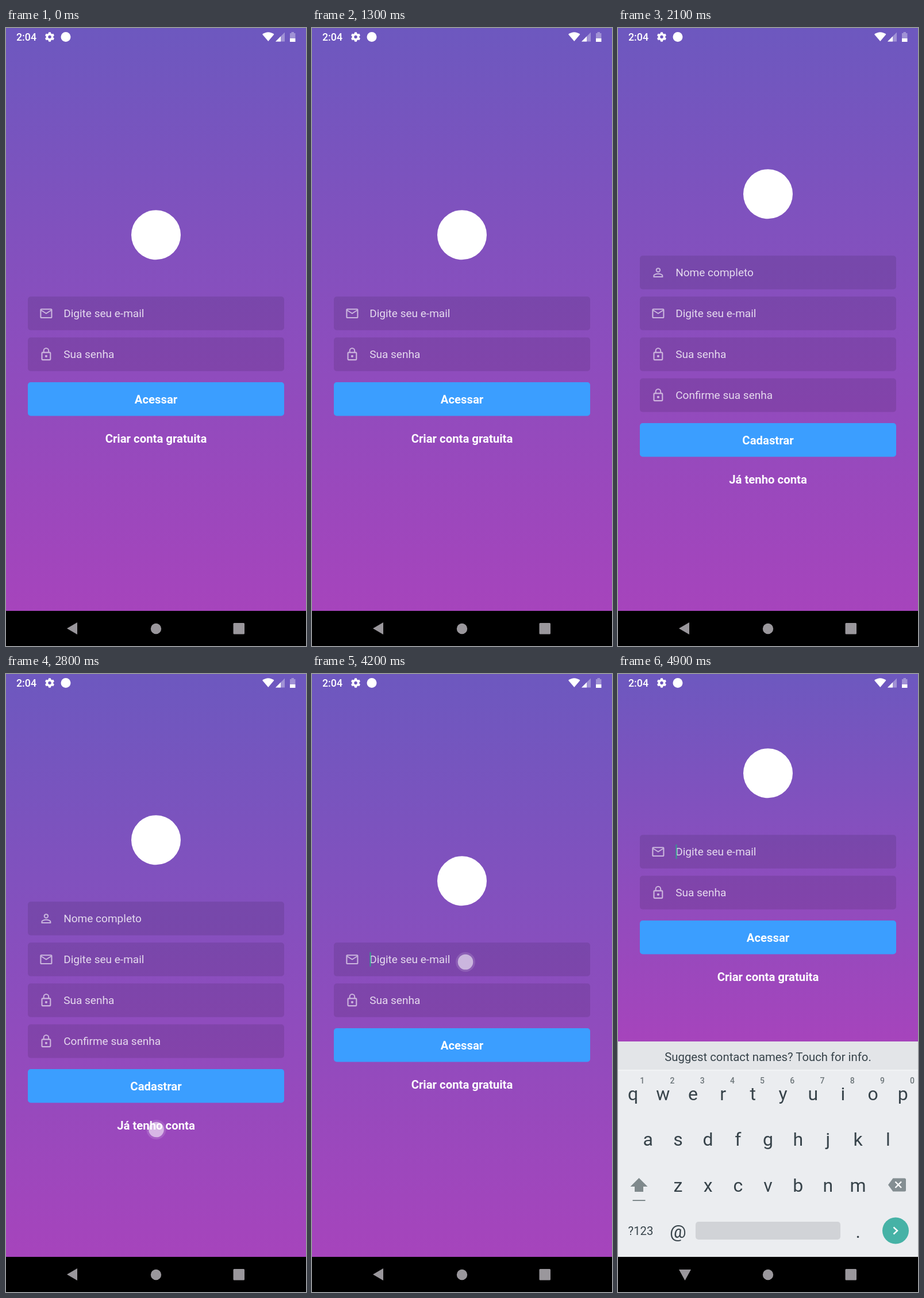
Animation, 522 px wide and 1073 px high, one loop 5 s. Source, as an HTML page:

```html
<!DOCTYPE html>
<html lang="pt-BR">
<head>
<meta charset="utf-8">
<title>Login</title>
<style>
  html, body { margin: 0; width: 100%; height: 100%; overflow: hidden; background: #000; }
  svg { display: block; width: 100vw; height: 100vh; }
  text { font-family: Roboto, sans-serif; fill: #fff; }
  .hint { font-size: 19.05px; fill-opacity: .8; }
  .bold { font-size: 20.32px; font-weight: 700; text-anchor: middle; }
  .icon { fill: #fff; fill-opacity: .6; }
  #keys text { fill: #37434a; text-anchor: middle; font-size: 32px; }
  #keys .digit { fill: #6c7579; font-size: 14px; font-weight: 500; }
  #keys .small { font-size: 20.32px; }
</style>
</head>
<body>
<svg id="stage" viewBox="0 0 522 1073" preserveAspectRatio="none"></svg>
<script>
const ICONS = {
  mail: 'M22 6c0-1.1-.9-2-2-2H4c-1.1 0-2 .9-2 2v12c0 1.1.9 2 2 2h16c1.1 0 2-.9 2-2V6zm-2 0l-8 5-8-5h16zm0 12H4V8l8 5 8-5v10z',
  lock: 'M12 17a2 2 0 1 0 0-4 2 2 0 0 0 0 4zm6-9h-1V6A5 5 0 0 0 7 6v2H6a2 2 0 0 0-2 2v10a2 2 0 0 0 2 2h12a2 2 0 0 0 2-2V10a2 2 0 0 0-2-2zM8.9 6a3.1 3.1 0 0 1 6.2 0v2H8.9V6zM18 20H6V10h12v10z',
  user: 'M12 5.9a2.1 2.1 0 1 1 0 4.2 2.1 2.1 0 0 1 0-4.2m0 9c3 0 6.1 1.5 6.1 2.1v1.1H5.9V17c0-.6 3.1-2.1 6.1-2.1M12 4a4 4 0 1 0 0 8 4 4 0 0 0 0-8zm0 9c-2.7 0-8 1.3-8 4v3h16v-3c0-2.7-5.3-4-8-4z'
};

const text = (x, y, cls, s) => `<text x="${x}" y="${y}" class="${cls}">${s}</text>`;
const box = (x, y, w, h, fill, r = 0) =>
  `<rect x="${x}" y="${y}" width="${w}" height="${h}" rx="${r}" fill="${fill}"/>`;
const path = (d, fill, extra = '') => `<path d="${d}" fill="${fill}" ${extra}/>`;
const circle = (x, y, r, fill, extra = '') =>
  `<circle cx="${x}" cy="${y}" r="${r}" fill="${fill}" ${extra}/>`;

const field = (y, icon, label) =>
  box(38, y, 446, 58.5, 'rgba(0,0,0,.1)', 5) +
  `<path class="icon" d="${ICONS[icon]}" transform="translate(57.2 ${y + 16.6}) scale(1.058)"/>` +
  text(100.2, y + 36, 'hint', label);

function form(top, fields, button, link) {
  const end = top + fields.length * 71;
  return circle(261, top - 107, 43, '#fff') +
    fields.map(([icon, label], i) => field(top + i * 71, icon, label)).join('') +
    box(38, end + 6.7, 446, 58.5, '#3b9eff', 5) +
    text(261, end + 44, 'bold', button) +
    text(261, end + 112, 'bold', link);
}

const row = (letters, x, y, cls = '') =>
  [...letters].map((c, i) => text(x + i * 52.2, y, cls, c)).join('');

function gear(x, y) {
  let s = `<g transform="translate(${x} ${y})"><circle r="4.6" fill="none" stroke="#fff" stroke-width="3.6"/>`;
  for (let a = 0; a < 360; a += 60)
    s += path('M-2.4-5L-1.8-8.2H1.8L2.4-5Z', '#fff', `transform="rotate(${a})"`);
  return s + '</g>';
}

const email = ['mail', 'Digite seu e-mail'], pass = ['lock', 'Sua senha'];

stage.innerHTML = `
<defs>
  <linearGradient id="sky" x1="0" y1="0" x2="0" y2="1">
    <stop stop-color="#6d58bf"/><stop offset="1" stop-color="#a644bc"/>
  </linearGradient>
</defs>
<rect id="back" width="522" height="1012" fill="url(#sky)"/>
<g id="login">${form(466.3, [email, pass], 'Acessar', 'Criar conta gratuita')}
  <rect id="caret" x="100.5" y="483" width="2" height="25" fill="#35998f"/>
</g>
<g id="signup">${form(395.3, [['user', 'Nome completo'], email, pass, ['lock', 'Confirme sua senha']],
  'Cadastrar', 'Já tenho conta')}</g>
<g id="status">
  <text x="18" y="22" font-size="17.8" font-weight="500">2:04</text>
  ${gear(76, 15.5)}
  ${circle(104, 15.5, 8.5, '#fff')}
  ${path('M446 11Q456.3 3.5 466.5 11L456.3 23Z', '#fff')}
  ${path('M469 23.5L485 7.5V23.5Z', '#fff', 'opacity=".35"')}
  ${path('M469 23.5L478 14.5V23.5Z', '#fff')}
  ${path('M494 9H496.5V7H501V9H503.5V18H494Z', '#fff', 'opacity=".35"')}
  ${path('M494 18H503.5V24H494Z', '#fff')}
</g>
<g id="keys">
  ${box(0, 638, 522, 374, '#ebedf0')}
  ${box(0, 638, 522, 50, '#e3e5e8')}
  ${box(0, 687, 522, 2, '#f1f3f5')}
  ${text(261, 672, 'small', 'Suggest contact names? Touch for info.')}
  ${row('qwertyuiop', 26, 739.5)}
  ${row('1234567890', 42.3, 710.5, 'digit')}
  ${row('asdfghjkl', 52.2, 819)}
  ${row('zxcvbnm', 104.4, 899)}
  ${path('M36.5 875L51.5 890H44V899H29V890H21.5Z', '#7f898c')}
  ${box(25.5, 913, 22, 2, '#7f898c')}
  ${path('M470 887L478.5 875.5H498.5Q501 875.5 501 878V896Q501 898.5 498.5 898.5H478.5Z', '#848e92')}
  ${path('M482.5 881.5L493 892M493 881.5L482.5 892', 'none', 'stroke="#fff" stroke-width="2.4"')}
  ${text(39.5, 973.5, 'small', '?123')}
  ${row('@', 104.4, 978.5)}
  ${row('.', 417.6, 978.5)}
  ${box(135, 951, 252, 31, '#d1d3d7', 5)}
  ${circle(483, 966.5, 23, '#46b2a6')}
  ${path('M479.5 960.5L486 966.5L479.5 972.5', 'none', 'stroke="#fff" stroke-width="2.4"')}
</g>
${box(0, 1012, 522, 61, '#000')}
<path id="arrow" fill="#9a979c"/>
${circle(261, 1043, 9.2, '#9a979c')}
${box(395.5, 1033, 19.5, 19.5, '#9a979c', 1.5)}
<g id="touch">${circle(0, 0, 17, '#fff', 'opacity=".13"')}${circle(0, 0, 13.3, '#fff', 'opacity=".55"')}</g>`;

const LOOP = 5000, SIGNUP = 1900, RETURN = 2900, FOCUS = 4200, KEYBOARD = 4300;
const TAPS = [[1800, 261, 720], [2800, 261.5, 791], [4100, 267, 500]];
const show = (el, on) => el.style.display = on ? '' : 'none';

function draw(now) {
  const t = Math.floor(now % LOOP / 100) * 100;
  const joining = t >= SIGNUP && t < RETURN, typing = t >= KEYBOARD;

  show(signup, joining);
  show(login, !joining);
  show(caret, t >= FOCUS);
  show(keys, typing);
  login.setAttribute('transform', `translate(0 ${typing ? -187 : 0})`);
  back.setAttribute('height', typing ? 638 : 1012);
  arrow.setAttribute('d', typing ? 'M106 1034H127L116.5 1053Z' : 'M106 1042.5L124 1032V1053Z');

  const tap = TAPS.find(([at]) => t >= at && t < at + 300);
  show(touch, tap && !(typing && t > KEYBOARD));
  if (tap) {
    touch.setAttribute('transform', `translate(${tap[1]} ${tap[2]})`);
    touch.setAttribute('opacity', t - tap[0] < 200 ? 1 : .33);
  }
  requestAnimationFrame(() => draw(performance.now() - start));
}
const start = performance.now();
draw(0);
</script>
</body>
</html>
```
